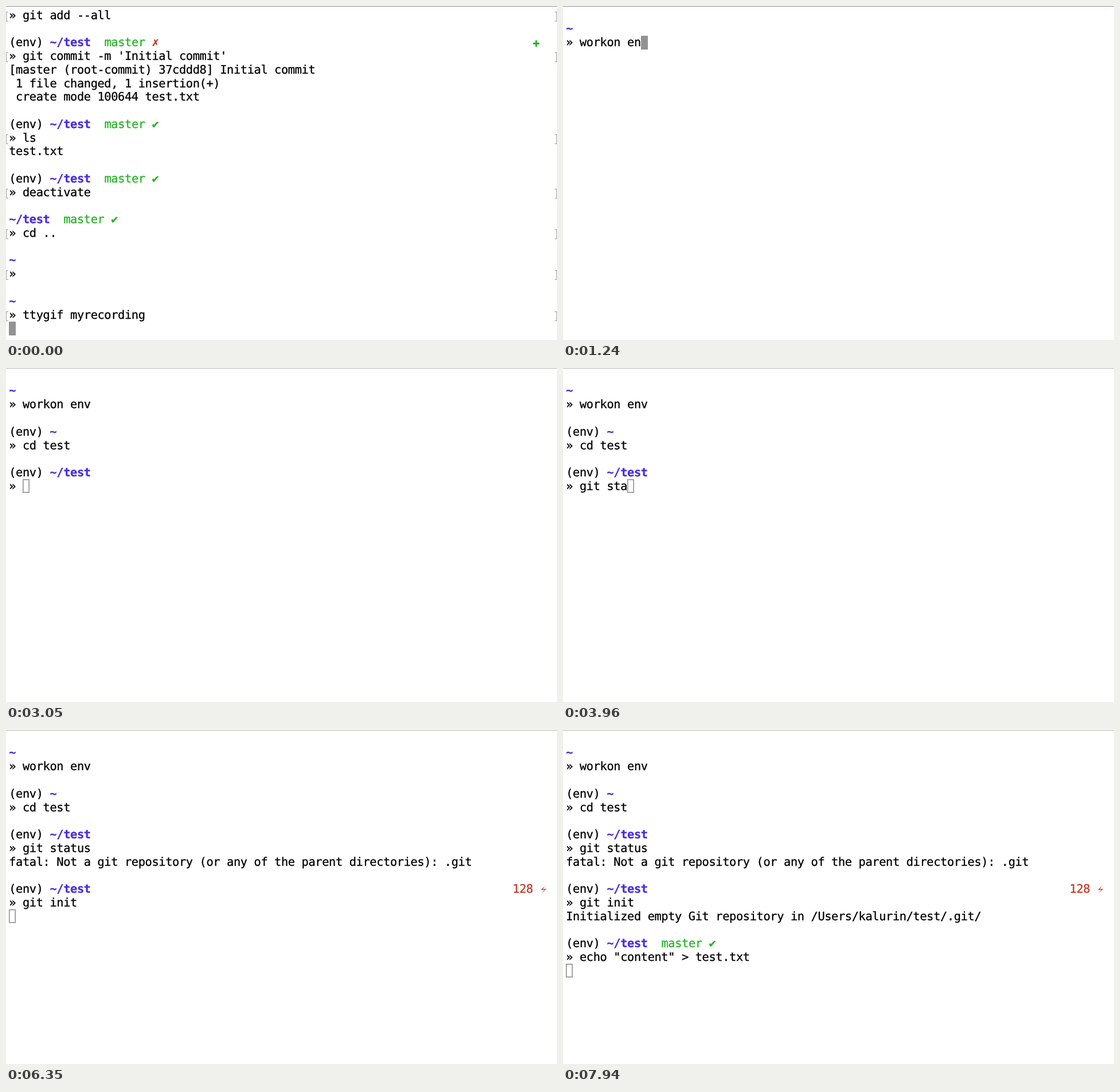
Recreate the animation shown at these times as an HTML page. Size 961x583 px, loop 8000 ms.

```html
<!DOCTYPE html>
<html lang="en">
<head>
<meta charset="utf-8">
<title>Terminal session</title>
<style>
  html, body { margin: 0; width: 100%; height: 100%; overflow: hidden; background: #fff; }
  #stage { position: relative; width: 961px; height: 583px; overflow: hidden; border-top: 1px solid #8a8a8a; box-sizing: border-box; }
  #stage.idle { border-color: #b9b9b9; }
  pre {
    position: absolute; left: 5.2px; top: 3.7px; margin: 0; color: #000;
    font: 20.37px/23.77px "DejaVu Sans Mono", monospace;
    letter-spacing: calc(11.87px - 1ch);
    text-rendering: geometricPrecision; font-variant-ligatures: none;
    -webkit-text-stroke: .3px currentColor;
  }
  .blue { color: #492ee1; font-weight: bold; }
  .green { color: #25b324; }
  .red { color: #c23621; }
  svg { position: absolute; overflow: visible; fill: currentColor; }
  .mark { position: absolute; left: -5.2px; width: 961px; height: 17px; margin-top: 5px; }
  .mark::before, .mark::after {
    content: ""; position: absolute; top: 0; width: 3px; height: 15px; border: 1px solid #a0a0a0;
  }
  .mark::before { left: 0; border-right: 0; }
  .mark::after { right: 0; border-left: 0; }
  #cursor { position: absolute; width: 12px; height: 24px; box-sizing: border-box; background: #929292; }
  .idle #cursor { background: none; border: 1px solid #929292; box-shadow: inset 0 0 0 1px #b8b8b8; }
</style>
</head>
<body>
<div id="stage"><div id="cursor"></div><pre id="text"></pre></div>
<script>
const LOOP = 8000, COL = 11.87, ROW = 23.77, LEFT = 5.2, TOP = 4.15;
const stage = document.getElementById('stage');
const text = document.getElementById('text');
const cursor = document.getElementById('cursor');

const color = name => s => `<span class="${name}">${s}</span>`;
const blue = color('blue'), green = color('green'), red = color('red');
const icon = d => `<svg width="12" height="24"><path d="${d}"/></svg>`;
const plus = green(icon('M4.3 8h3v4h4v3h-4v4h-3v-4h-4v-3h4z'));
const bolt = icon('M9.5 5.4L2 13.2l6.2-.5-6 6.6 9.3-8-6.2.5z');
const gap = n => ' '.repeat(n);

const home = blue('~'), dir = blue('~/test');
const clean = '  ' + green('master ✔');
const dirty = '  ' + green('master ') + red('✗');
const env = '(env) ';

const history = `» git add --all

${env}${dir}${dirty}${gap(55)}${plus}
» git commit -m 'Initial commit'
[master (root-commit) 37cddd8] Initial commit
 1 file changed, 1 insertion(+)
 create mode 100644 test.txt

${env}${dir}${clean}
» ls
test.txt

${env}${dir}${clean}
» deactivate

${dir}${clean}
» cd ..

${home}
» 

${home}
» ttygif myrecording
`.replace(/^»/gm, '<span class="mark"></span>»');

const steps = [{ time: 0, screen: history }, { time: 40, screen: '' }];
const add = (time, s) => steps.push({ time, screen: steps[steps.length - 1].screen + s });
const prompt = (time, s) => add(time, `\n${s}\n» `);
// Spread keystrokes evenly between two times, both included.
const type = (from, to, keys) =>
  [...keys].forEach((k, i) => add(from + (to - from) * i / (keys.length - 1), k));

prompt(460, home);
type(640, 1240, 'workon en');
type(1450, 1480, 'v\n');
prompt(1770, env + home);
type(2020, 2130, 'cd ');
type(2330, 2380, 'tes');
type(2830, 2900, 't\n');
prompt(3050, env + dir);
type(3120, 3190, 'gi');
type(3390, 3570, 't st');
type(3960, 4020, 'at');
type(4100, 4260, 'us\n');
add(4330, 'fatal: Not a git repository (or any of the parent directories): .git\n');
prompt(4410, env + dir + gap(62) + red('128 ' + bolt));
type(4550, 4590, 'gi');
type(5370, 5600, 't in');
add(6080, 'i');
type(6310, 6350, 't\n');
add(6930, 'Initialized empty Git repository in /Users/kalurin/test/.git/\n');
prompt(7180, env + dir + clean);
type(7265, 7350, 'ec');
type(7680, 7770, 'ho');
add(7850, ' "content" > test.txt');
add(7940, '\n');

const isIdle = t => (t >= 1770 && t < 4330) || t >= 6310;

let shown;
function show(step) {
  const lines = step.screen.replace(/<[^>]*>/g, '').split('\n');
  const row = lines.length - 1;
  text.innerHTML = step.screen;
  cursor.style.left = Math.round(LEFT + COL * lines[row].length) + 'px';
  cursor.style.top = Math.round(TOP + ROW * row) - 1 + 'px';
  stage.className = isIdle(step.time) ? 'idle' : '';
}

const start = performance.now();
function tick() {
  const t = (performance.now() - start) % LOOP;
  const step = steps.findLast(s => s.time <= t + 0.01) || steps[0];
  if (step !== shown) show(shown = step);
  requestAnimationFrame(tick);
}
tick();
</script>
</body>
</html>
```
